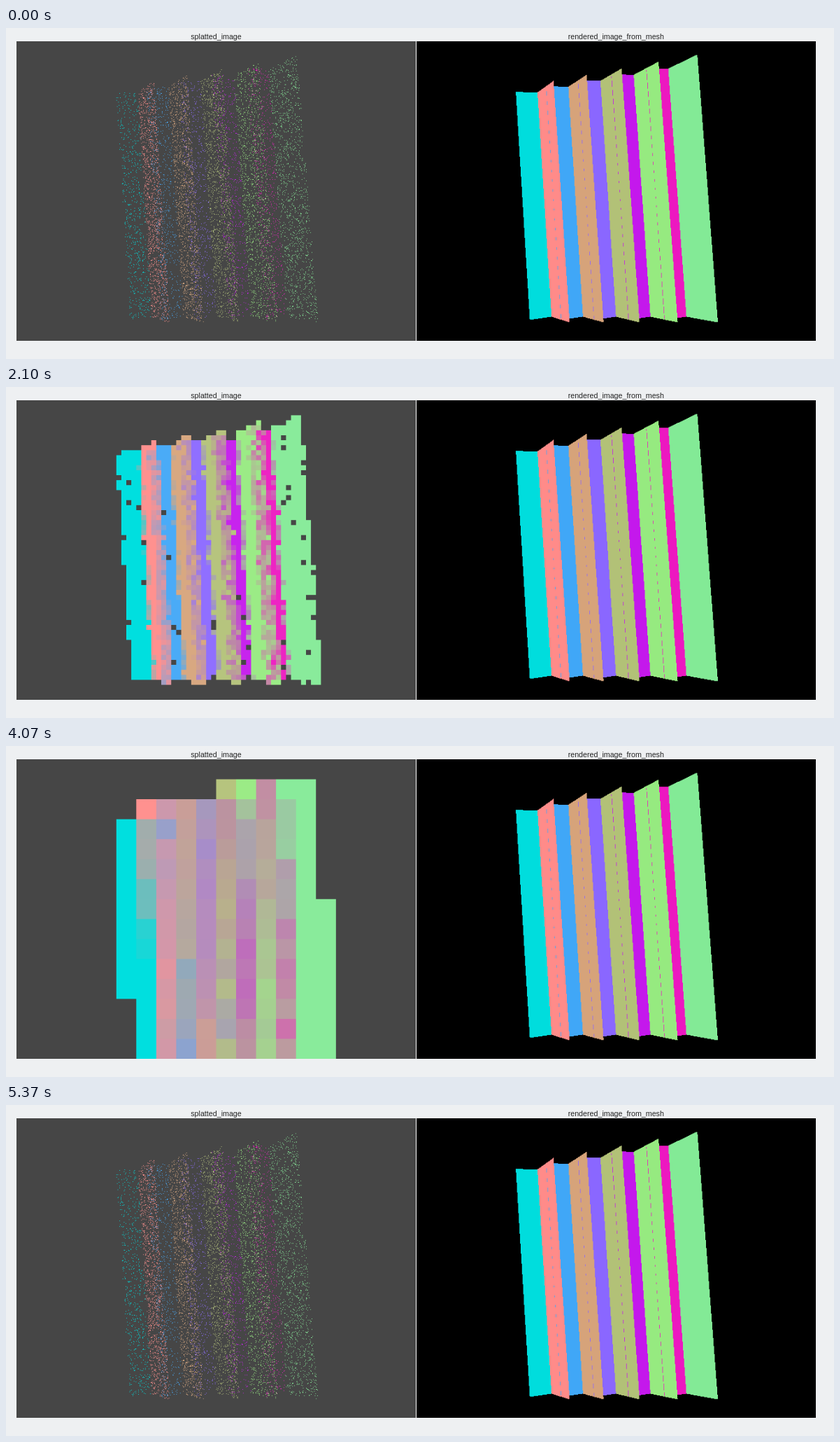
Write an HTML page with a canvas that moves like this. It is 1184 px wide and 473 px high and loops after 6510 ms.

```html
<!DOCTYPE html>
<html lang="en">
<head>
<meta charset="utf-8">
<title>Splatting</title>
<style>
  html, body { margin: 0; width: 100%; height: 100%; overflow: hidden; background: #eef0f2; }
  canvas { position: absolute; left: 0; top: 0; }
  div {
    position: absolute; top: 5px; width: 400px; text-align: center;
    font: 10.7px/14px "Liberation Sans", Arial, sans-serif; color: #222;
  }
</style>
</head>
<body>
<canvas id="stage" width="1184" height="473"></canvas>
<div style="left:100.5px">splatted_image</div>
<div style="left:672.3px">rendered_image_from_mesh</div>
<script>
const W = 640, H = 480;
const PANEL = { left: 15, right: 587, top: 19, w: 571, h: 428 };
const LOOP = 6510;

// The size doubles or halves as a slider is dragged: [start time, exponent of 2]
const SCHEDULE = [
  [0, 0], [630, 1], [830, 2], [900, 3], [1130, 4], [2100, 3], [2200, 2], [2400, 1],
  [2630, 0], [3470, 1], [3730, 4], [4070, 5], [4830, 3], [4970, 2], [5130, 1], [5370, 0]
];

const FRONT = ["#ff8b89", "#d6a37a", "#b2c177", "#96ea80", "#83ea96"];
const BACK = ["#00dddd", "#40a7f7", "#8a67ff", "#c418ec", "#ec18c0"];

const mix = (a, b, t) => a + (b - a) * t;
const parse = hex => [1, 3, 5].map(i => parseInt(hex.slice(i, i + 2), 16));
const rgb = c => `rgb(${c.map(Math.round)})`;
const lighten = c => c.map(v => v && mix(v, 255, 0.05));

// Corners run top left, top right, bottom right, bottom left.
const face = (hex, count, ...corners) => ({
  color: parse(hex),
  count,
  quad: corners.map(([x, y]) => [
    (x - PANEL.right) * W / PANEL.w, (y - PANEL.top) * H / PANEL.h
  ])
});

// Pleats of a folded sheet, spreading slightly from left to right
const curve = (a, b, c) => k => a + b * k + c * k * k;
const foldTop = curve(760, 43.25, 0.875), foldBottom = curve(780, 44, 1.06);
const ridgeTop = curve(783, 46, 1.35), ridgeBottom = curve(806, 47, 1.5);
const hiddenTop = curve(729, 42.3, 1.1), hiddenBottom = curve(749, 43.8, 1.1);
const foldY = curve(92, -8, -0.125), ridgeY = curve(75.5, -8.4, -0.25);

const backFaces = BACK.map((color, k) => face(color, 620,
  [hiddenTop(k), foldY(k) - 0.5], [foldTop(k), foldY(k)],
  [foldBottom(k), 412.6], [hiddenBottom(k), 417]));
const frontFaces = FRONT.map((color, k) => face(color, 1300,
  [foldTop(k), foldY(k)], [ridgeTop(k), ridgeY(k)],
  [ridgeBottom(k), 420.7], [foldBottom(k), 412.6]));
const faces = [...backFaces, ...frontFaces];

function makeRandom(seed) {
  return () => {
    seed = (seed + 0x6D2B79F5) | 0;
    let t = Math.imul(seed ^ (seed >>> 15), 1 | seed);
    t = (t + Math.imul(t ^ (t >>> 7), 61 | t)) ^ t;
    return ((t ^ (t >>> 14)) >>> 0) / 4294967296;
  };
}

function inside(quad, x, y) {
  return quad.every(([ax, ay], i) => {
    const [bx, by] = quad[(i + 1) % 4];
    return (bx - ax) * (y - ay) - (by - ay) * (x - ax) >= 0;
  });
}

function layer(background) {
  const c = document.createElement("canvas");
  c.width = W;
  c.height = H;
  const g = c.getContext("2d");
  g.fillStyle = background;
  g.fillRect(0, 0, W, H);
  return g;
}

function samplePoints() {
  const rnd = makeRandom(7);
  return faces.flatMap(({ color, count, quad: [a, b, c, d] }) =>
    Array.from({ length: count }, () => {
      const u = rnd(), v = rnd();
      const at = i => mix(mix(a[i], b[i], u), mix(d[i], c[i], u), v);
      return { x: at(0), y: at(1), color: lighten(color) };
    }));
}

// Each cell takes the mean colour of the points that round to it.
function splat(points, size) {
  const g = layer("#464646"), cells = new Map();
  for (const { x, y, color } of points) {
    const col = Math.round(x / size), row = Math.round(y / size), key = col * H + row;
    if (!cells.has(key)) cells.set(key, { col, row, n: 0, sum: [0, 0, 0] });
    const cell = cells.get(key);
    cell.n++;
    color.forEach((v, i) => cell.sum[i] += v);
  }
  for (const { col, row, n, sum } of cells.values()) {
    g.fillStyle = rgb(sum.map(v => v / n));
    g.fillRect(col * size, row * size, size, size);
  }
  return g.canvas;
}

function renderMesh() {
  const g = layer("#000");
  for (const { color, quad } of faces) {
    const xs = quad.map(p => p[0]), ys = quad.map(p => p[1]);
    g.fillStyle = rgb(color);
    for (let y = Math.floor(Math.min(...ys)); y <= Math.max(...ys); y++) {
      for (let x = Math.floor(Math.min(...xs)); x <= Math.max(...xs); x++) {
        if (inside(quad, x + 0.5, y + 0.5)) g.fillRect(x, y, 1, 1);
      }
    }
  }
  // Hidden edges show through wherever they come close to a pixel centre.
  g.globalAlpha = 0.85;
  backFaces.slice(1).forEach(({ color, quad: [a, , , d] }, k) => {
    g.fillStyle = rgb(color);
    for (let y = Math.ceil(a[1]) + 2; y < d[1] - 2; y++) {
      const u = (y - a[1]) / (d[1] - a[1]), x = mix(a[0], d[0], u);
      const duty = 0.2 + (0.25 + 0.12 * k) * Math.abs(2 * u - 1);
      if (Math.abs(x - Math.floor(x) - 0.5) < duty / 2) g.fillRect(Math.floor(x), y, 1, 1);
    }
  });
  return g.canvas;
}

const ctx = document.getElementById("stage").getContext("2d");
ctx.imageSmoothingQuality = "high";
const points = samplePoints();
const splats = Array.from({ length: 6 }, (_, level) => splat(points, 2 ** level));
const mesh = renderMesh();

const show = (img, x) => ctx.drawImage(img, x, PANEL.top, PANEL.w, PANEL.h);
const start = performance.now();
let shown = -1;

ctx.fillStyle = "#fff";
ctx.fillRect(PANEL.left + PANEL.w, PANEL.top, 1, PANEL.h);
show(mesh, PANEL.right);

function tick() {
  const t = (performance.now() - start) % LOOP;
  const level = SCHEDULE.findLast(s => s[0] <= t)[1];
  if (level !== shown) show(splats[shown = level], PANEL.left);
  requestAnimationFrame(tick);
}
tick();
</script>
</body>
</html>
```
